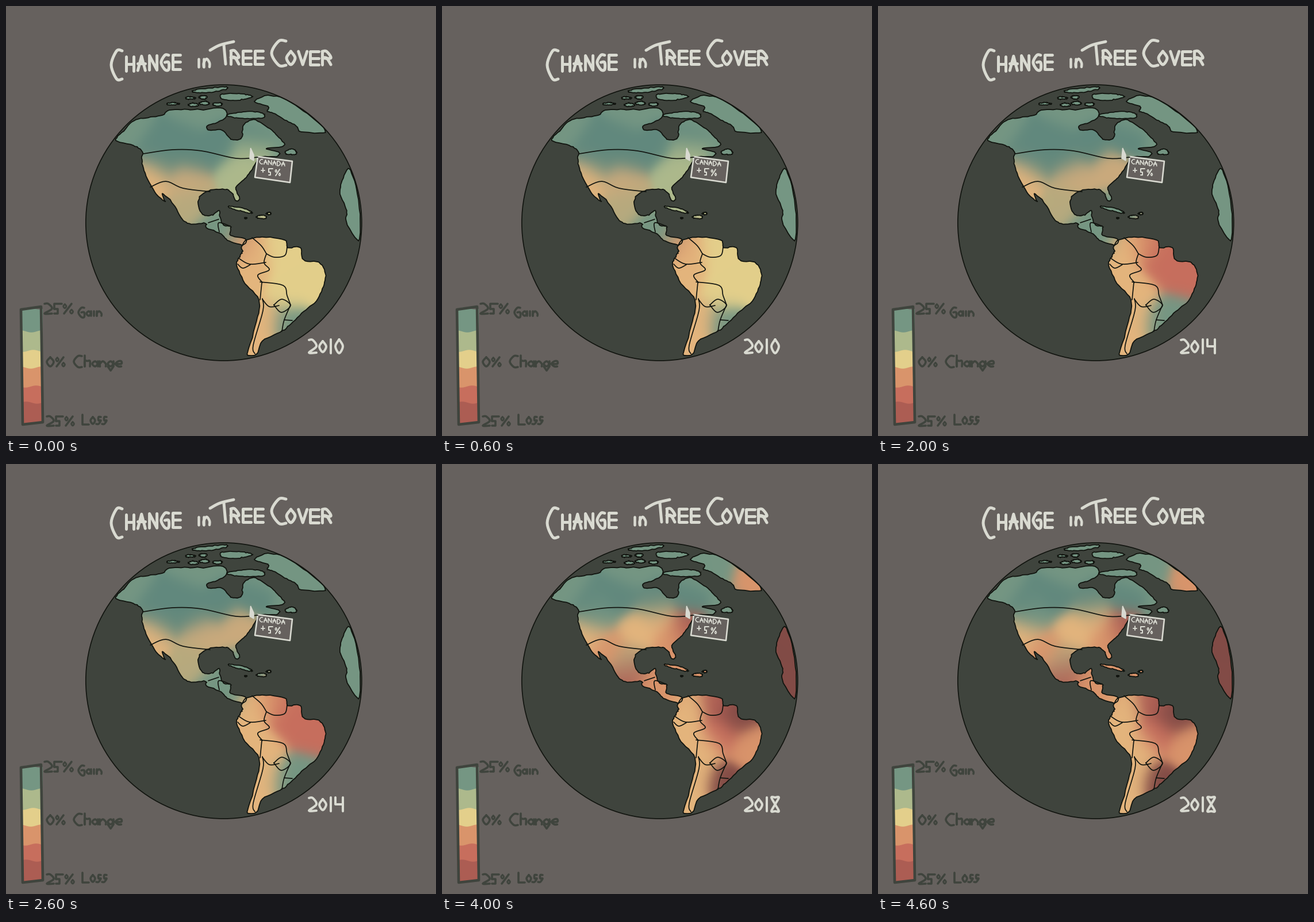
Write a matplotlib script that moves like this. It is 748x748 px and loops after 5000 ms.

```python
import numpy as np
import matplotlib.pyplot as plt
from matplotlib.animation import FuncAnimation
from matplotlib.colors import to_rgb
from matplotlib.patches import Circle, PathPatch, Polygon
from matplotlib.path import Path

SIZE = 748
PX = 0.72  # one pixel in points at 100 dpi
BG, SEA, INK, CHALK = "#66615e", "#3f443d", "#11140f", "#d9dad1"
PALETTE = dict(T="#759683", D="#61887d", G="#adb98c", Y="#e3cf8b",
               L="#e4b57d", O="#d9946b", R="#c76e5d", M="#ac5d53",
               K="#824b46", H="#b7aa7e", S="#cbaa7c")

# ---- geography -------------------------------------------------------
NORTH = [(191, 234), (205, 217), (222, 200), (247, 194), (272, 190),
         (284, 181), (316, 180), (343, 180), (377, 178), (384, 191),
         (371, 201), (350, 208), (354, 216), (376, 216), (392, 232),
         (410, 229), (413, 208), (430, 198), (456, 211), (472, 226),
         (484, 243)]
EAST = [(452, 248), (474, 254), (470, 262), (441, 263), (432, 278),
        (424, 290), (416, 300), (400, 316), (406, 334), (400, 339),
        (390, 322), (370, 319), (345, 325), (334, 341), (342, 362),
        (357, 364), (371, 356), (372, 366), (378, 381), (391, 384),
        (391, 399), (416, 405)]
WEST = [(413, 415), (388, 409), (374, 397), (349, 386), (347, 378),
        (322, 379), (306, 370), (292, 345), (272, 326), (277, 341),
        (259, 323), (242, 291), (236, 267), (237, 253), (221, 242)]
SOUTH = [(410, 418), (421, 406), (446, 402), (485, 407), (490, 420),
         (512, 420), (517, 442), (544, 446), (556, 466), (552, 488),
         (540, 513), (518, 531), (496, 553), (477, 567), (446, 583),
         (437, 605), (424, 608), (421, 601), (436, 548), (440, 511),
         (416, 482), (402, 452), (404, 440), (411, 428)]
GREENLAND = [(432, 166), (455, 156), (489, 164), (530, 192), (556, 219),
             (513, 219), (506, 209), (488, 200), (465, 186), (455, 183),
             (456, 175)]
AFRICA = [(597, 283), (585, 303), (581, 328), (593, 356), (592, 376),
          (613, 408), (616, 370), (610, 320)]
# centre x, centre y, half width, half height, slope
ISLANDS = [(355, 146, 31, 4, -.1), (398, 158, 28, 6), (420, 190, 33, 6),
           (496, 254, 10, 5), (408, 354, 21, 3, .25), (445, 367, 9, 3),
           (457, 361, 4, 2), (417, 369, 2, 1), (321, 160, 9, 2),
           (343, 159, 7, 3), (345, 169, 9, 3), (326, 172, 9, 3),
           (290, 170, 11, 2), (368, 171, 8, 3)]
BORDERS = [
    [(239, 257), (290, 250), (340, 252), (400, 265), (438, 263)],
    [(251, 315), (278, 305), (308, 317), (355, 323)],
    [(352, 377), (370, 371)], [(371, 393), (370, 377), (390, 383)],
    [(428, 403), (444, 417), (453, 431)],
    [(453, 431), (467, 437), (485, 434), (489, 419)],
    [(453, 431), (449, 447), (458, 459), (438, 468), (446, 481)],
    [(405, 439), (424, 449), (452, 446)],
    [(403, 449), (412, 456), (425, 450)],
    [(442, 480), (482, 486), (489, 504), (495, 520)],
    [(445, 481), (442, 511)], [(446, 510), (458, 523), (475, 521)],
    [(466, 520), (480, 510), (495, 521), (479, 533), (466, 520)],
    [(446, 509), (447, 530), (430, 590), (433, 605)],
    [(495, 520), (484, 546), (480, 566)], [(484, 546), (498, 547)]]

# ---- colour anchors of the tree cover map ----------------------------
COMMON = dict(
    T=[(215, 215), (330, 185), (400, 155), (475, 190), (440, 192)],
    D=[(260, 245), (310, 232), (370, 242), (430, 230)],
    H=[(325, 342)], L=[(255, 296), (418, 470), (430, 588)])
EARLY = dict(
    T=[(530, 208), (596, 310), (602, 370), (496, 254), (368, 385),
       (386, 395), (492, 550)],
    D=[(275, 268), (325, 262)])
IN_2010 = dict(
    G=[(405, 290), (428, 256), (410, 350)], S=[(315, 302)], O=[(408, 411)],
    Y=[(480, 415), (510, 455), (535, 480), (490, 500)],
    L=[(430, 422), (448, 545)])
IN_2012 = dict(
    G=[(408, 408), (432, 415), (430, 600), (405, 335)],
    S=[(340, 295), (405, 285)], Y=[(280, 325), (490, 412), (538, 460)],
    T=[(415, 355), (515, 533)], L=[(450, 535)],
    O=[(445, 450), (455, 495)], R=[(475, 455), (500, 490)])
IN_2014 = dict(
    T=[(415, 355), (515, 533)], S=[(340, 295), (405, 285)],
    L=[(430, 420), (455, 500), (448, 545)], O=[(462, 412)],
    R=[(488, 420), (500, 455), (530, 475)])
IN_2016 = dict(
    Y=[(325, 275), (285, 285), (535, 208), (496, 254)], H=[(395, 300)],
    T=[(430, 358), (592, 292)], L=[(455, 495), (440, 545)], O=[(450, 415)],
    R=[(482, 412), (500, 455), (535, 475)],
    M=[(366, 380), (388, 397), (412, 414), (604, 360), (505, 530),
       (480, 550)])
IN_2018 = dict(
    T=[(496, 254), (270, 265)],
    L=[(340, 290), (375, 270), (430, 420), (455, 495), (442, 545)],
    O=[(290, 320), (400, 300), (368, 385), (388, 398), (405, 352),
       (450, 366), (538, 208), (535, 492)],
    M=[(425, 284), (328, 362), (475, 412)], R=[(485, 470)],
    K=[(512, 440), (490, 556), (595, 310), (602, 370)])
YEARS = {"2010": (EARLY, IN_2010), "2012": (EARLY, IN_2012),
         "2014": (EARLY, IN_2014), "2016": (IN_2016,), "2018": (IN_2018,)}

# ---- handwriting: strokes over a phone keypad, 0 hangs below ---------
GLYPHS = {
    "0": "24862", "1": "28", "2": "12679", "4": "146 39", "5": "314 4587",
    "6": "2478654", "8": "215987532", "+": "46 28", "%": "37",
    "A": "729 46", "C": "32489", "D": "17 12687", "E": "3179 46",
    "G": "3248965", "H": "17 39 46", "L": "179", "N": "7193", "O": "24862",
    "R": "17 126459", "T": "13 28", "V": "183", "a": "62486 39",
    "e": "4632489", "g": "62486 3907", "h": "17 74569", "i": "28",
    "n": "17 74269", "o": "24862", "s": "325687"}


def smooth(points, closed=False, n=6):
    """Catmull-Rom curve through the points."""
    p = np.array(points, float)
    p = np.vstack([p[-1:], p, p[:2]] if closed else [p[:1], p, p[-1:]])
    t = np.linspace(0, 1, n, endpoint=False)[:, None]
    out = []
    for a, b, c, d in zip(p, p[1:], p[2:], p[3:]):
        out.append(b + .5 * t * (c - a + t * (2*a - 5*b + 4*c - d
                                              + t * (3*(b - c) + d - a))))
    return np.vstack(out + [p[-2:-1]])


def coast(points):
    """Closed shoreline with a slightly rough edge."""
    line = smooth(points, closed=True)
    line[1:-1] += rng.normal(0, .4, line[1:-1].shape)
    return Path(line, closed=True)


def island(x, y, w, h, slope=0):
    a = np.linspace(0, 2 * np.pi, 9)[:-1]
    r = 1 + .12 * np.sin(3 * a + x)
    dx = w * r * np.cos(a)
    return list(zip(x + dx, y + h * r * np.sin(a) + slope * dx))


def stroke(points, color, width):
    x, y = np.transpose(points)
    return ax.plot(x, y, color=color, lw=width * PX, zorder=3,
                   solid_capstyle="round", solid_joinstyle="round")[0]


def key_point(key):
    k = int(key) - 1
    return (.5, 1.8) if k < 0 else (k % 3 / 2, k // 3 / 2)


def write(text, x, y, w, h, step=0, color=CHALK, width=5, slope=0):
    lines = []
    for i, ch in enumerate(text):
        left, top = x + i * step, y + slope * i * step
        for keys in GLYPHS[ch].split():
            pts = np.array([key_point(k) for k in keys]) * (w, h) + (left, top)
            lines.append(stroke(smooth(pts) if len(keys) > 4 else pts,
                                color, width))
        if ch == "%":
            for u, v in ((-.1, .05), (.8, .6)):
                write("0", left + u * w, top + v * h, .4 * w, .4 * h,
                      color=color, width=.8 * width)
        if ch == "i":
            stroke([(left + w / 2, top - h / 2)] * 2, color, width)
    return lines


def shade(layers, spread=19):
    """Blend the anchor colours into a soft map."""
    g = np.arange(1, SIZE, 2)
    gx, gy = np.meshgrid(g, g)
    spots = [(x, y, to_rgb(PALETTE[k])) for layer in (COMMON, *layers)
             for k, pts in layer.items() for x, y in pts]
    power = np.array([-((gx - x)**2 + (gy - y)**2) / (2 * spread**2)
                      for x, y, _ in spots])
    weight = np.exp(power - power.max(axis=0))
    colors = np.array([c for _, _, c in spots])
    return np.tensordot(weight / weight.sum(axis=0), colors, (0, 0))


rng = np.random.default_rng(4)
fig = plt.figure(figsize=(SIZE / 100, SIZE / 100), dpi=100, facecolor=BG)
ax = fig.add_axes([0, 0, 1, 1])
ax.axis("off")

# globe
ax.add_patch(Circle((378.8, 377), 240, fc=SEA, ec=INK, lw=1.7 * PX))
shores = [NORTH + EAST + WEST, SOUTH, GREENLAND, AFRICA]
shores += [island(*i) for i in ISLANDS]
land = Path.make_compound_path(*map(coast, shores))
maps = [shade(layers) for layers in YEARS.values()]
cover = ax.imshow(maps[0], extent=(0, SIZE, SIZE, 0), aspect="auto",
                  interpolation="bilinear", zorder=1.5)
ax.set(xlim=(0, SIZE), ylim=(SIZE, 0))
cover.set_clip_path(land, ax.transData)
ax.add_patch(PathPatch(land, fc="none", ec=INK, lw=1.8 * PX, zorder=1.8))
for b in BORDERS:
    stroke(smooth(b), INK, 1.7)

# pointer and label
ax.add_patch(Polygon([(425.5, 247), (431, 259), (431, 269), (424, 265)],
                     fc=CHALK, ec=CHALK, lw=1.5 * PX, zorder=4))
ax.add_patch(Polygon([(438, 262), (498, 270), (494, 307), (433, 298)],
                     fc=BG, ec=CHALK, lw=2.6 * PX, joinstyle="round",
                     zorder=2.5))
write("CANADA", 441, 267, 5.5, 7.5, 7.7, width=1.6, slope=.1)
write("+", 444, 282, 6, 7, width=1.9)
write("5%", 457, 283, 7, 11, 12, width=2, slope=.1)

# title
write("C", 183, 78, 19, 49)
write("HANGE", 209, 88, 13, 25, 20.3, slope=-.04)
write("in", 330, 92, 10, 14, 14, width=4.5)
stroke(smooth([(355, 77), (372, 68), (396, 62)]), CHALK, 5)
stroke([(379, 68), (382, 101)], CHALK, 5)
write("REE", 391, 78, 14, 23, 21)
write("C", 462, 61, 25, 42)
write("OVER", 488, 79, 15, 23, 20.7)

# legend
levels = [526, 566, 600, 629, 662, 690]
wave = np.linspace(26, 64, 20)
for y, key in zip(levels, "TGYORM"):
    top = list(zip(wave, y + 1.8 * np.sin(wave / 6 + y)))
    ax.add_patch(Polygon(top + [(64, 724), (29, 728)], fc=PALETTE[key], lw=0))
ax.add_patch(Polygon([(26, 528), (61, 523), (64, 724), (29, 728)], fc="none",
                     ec=SEA, lw=4.6 * PX, joinstyle="round", zorder=2))
dark = dict(color=SEA, width=3.6)
write("25%", 67, 518, 13, 17, 17, **dark)
write("G", 126, 525, 10, 16, **dark)
write("ain", 140, 531, 8, 8, 9, **dark)
write("0%", 71, 611, 12, 16, 17, **dark)
write("C", 118, 609, 14, 19, **dark)
write("h", 137, 608, 9, 19, **dark)
write("ange", 150, 618, 10, 9, 13.5, **dark)
write("25%", 71, 714, 12, 16, 16.5, **dark)
write("L", 133, 711, 11, 17, **dark)
write("oss", 147, 715, 8, 12, 10, **dark)

# year
write("2", 527, 581, 13, 22, width=4)
write("0", 545, 583, 12, 19, width=4)
write("1", 559, 580, 13, 24, width=4)
digits = [write(y[-1], 573, 580, 13, 24, width=4) for y in YEARS]


def draw(i):
    cover.set_data(maps[i])
    for k, lines in enumerate(digits):
        for line in lines:
            line.set_visible(k == i)
    return [cover]


anim = FuncAnimation(fig, draw, frames=len(YEARS), interval=1000, repeat=True,
                     repeat_delay=0, blit=False)
plt.show()
```
